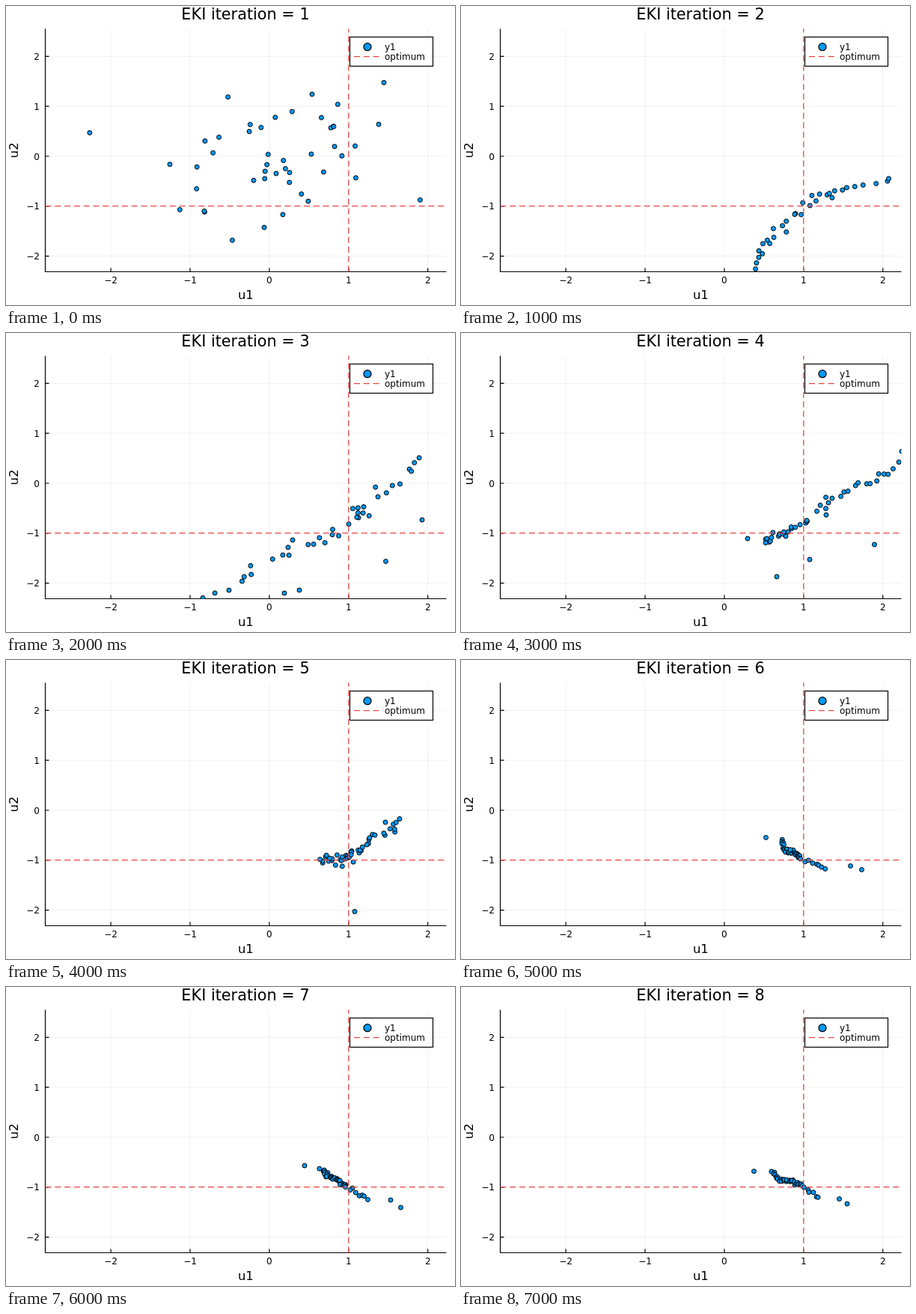
Recreate the animation shown at these times as an HTML page. Size 600 by 400 pixels, loop 8 s.

```html
<!DOCTYPE html>
<html lang="en">
<head>
<meta charset="utf-8">
<title>EKI iterations</title>
<style>
  html, body { margin: 0; width: 100%; height: 100%; overflow: hidden; background: #fff; }
  svg { display: block; font: 12px "DejaVu Sans", sans-serif; }
  .grid { stroke: #000; stroke-opacity: .06; }
  .axis { stroke: #000; stroke-width: 1.2; fill: none; }
  .dot { fill: #009afa; stroke: #000; }
  .optimum { stroke: #e94848; stroke-width: 1.3; stroke-dasharray: 8 4.8; }
  .mid { text-anchor: middle; }
  .end { text-anchor: end; }
  .title { font-size: 20.8px; }
  .guide { font-size: 16.4px; }
  .step { visibility: hidden; animation: show 8s step-end infinite; }
  @keyframes show {
    0% { visibility: visible; }
    12.5%, 100% { visibility: hidden; }
  }
</style>
</head>
<body>
<svg width="600" height="400" viewBox="0 0 600 400">
  <clipPath id="plot"><rect x="52.5" y="30.5" width="536" height="325"/></clipPath>
  <g id="frame"></g>
  <path class="axis" d="M52.5 30.5V355.5H588.5"/>
  <text class="mid guide" x="320.3" y="392">u1</text>
  <text class="mid guide" transform="translate(16 193) rotate(-90)">u2</text>
  <g id="steps"></g>
  <path class="optimum" d="M457.8 355.5V30.5"/>
  <path class="optimum" d="M52.5 267.7H588.5"/>
  <rect x="459.5" y="41.5" width="111" height="39" fill="#fff" stroke="#000" stroke-width="1.2"/>
  <circle class="dot" cx="483" cy="54.7" r="5" stroke-width="1.3"/>
  <path class="optimum" d="M465 67.7H499"/>
  <text x="506" y="59">y1</text>
  <text x="506" y="72">optimum</text>
</svg>
<script>
const SIZE = 46;
const toX = u => 351.9 + 105.9 * u;
const toY = u => 201 - 66.8 * u;

const make = (parent, tag, attrs, text = '') => {
  const el = document.createElementNS('http://www.w3.org/2000/svg', tag);
  for (const key in attrs) el.setAttribute(key, attrs[key]);
  el.textContent = text;
  return parent.appendChild(el);
};

const frame = document.getElementById('frame');
for (let v = -2; v <= 2; v++) {
  const x = toX(v), y = toY(v);
  const label = String(v).replace('-', '\u2212');
  make(frame, 'path', { class: 'grid', d: `M${x} 30.5V355.5M52.5 ${y}H588.5` });
  make(frame, 'path', { class: 'axis', d: `M${x} 355.5v-5M52.5 ${y}h5` });
  make(frame, 'text', { class: 'mid', x, y: 371 }, label);
  make(frame, 'text', { class: 'end', x: 45, y: y + 4.5 }, label);
}

let seed = 7;
const random = () => (seed = seed * 48271 % 2147483647) / 2147483647;
const normal = () => Math.sqrt(-2 * Math.log(1 - random())) * Math.cos(2 * Math.PI * random());

// The prior is a standard normal cloud.
const prior = () => Array.from({ length: SIZE }, () => [toX(normal()), toY(normal())]);

// Particles spread evenly over the path's segments with some noise, plus stray ones.
const along = (spread, path, strays) => {
  const count = SIZE - strays.length;
  const cloud = Array.from({ length: count }, (_, i) => {
    const t = i / (count - 1) * (path.length - 1);
    const k = Math.min(Math.floor(t), path.length - 2);
    const [a, b] = [path[k], path[k + 1]];
    return a.map((v, j) => v + (b[j] - v) * (t - k) + spread * normal());
  });
  return [...cloud, ...strays];
};

const steps = document.getElementById('steps');
let iteration = 0;
const addStep = cloud => {
  const step = make(steps, 'g', { class: 'step', style: `animation-delay:${iteration - 8}s` });
  make(step, 'text', { class: 'mid title', x: 320, y: 18.3 }, `EKI iteration = ${++iteration}`);
  const dots = make(step, 'g', { 'clip-path': 'url(#plot)' });
  for (const [cx, cy] of cloud) make(dots, 'circle', { class: 'dot', cx, cy, r: 3 });
};

addStep(prior());
addStep(along(4,
  [[340, 470], [392, 352], [407, 316], [436, 286], [475, 257], [506, 246], [582, 232], [700, 200]], []));
addStep(along(5,
  [[170, 378], [278, 352], [352, 304], [406, 282], [460, 257], [470, 237], [506, 214], [555, 167]],
  [[372, 348], [392, 344], [507.5, 305.5], [556, 250]]));
addStep(along(4,
  [[405, 282], [421, 270], [440, 266], [471, 249], [500, 219], [548, 198], [587, 168]],
  [[383, 275], [422, 326], [466, 303], [552.5, 283]]));
addStep(along(4,
  [[420, 270], [440, 268], [456, 266], [470, 254], [500, 235], [525, 215]],
  [[466, 336.5]]));
addStep(along(1.5,
  [[428, 240], [431, 252], [436, 257], [444, 256], [450, 261], [455, 265], [487, 279]],
  [[407.5, 237.5], [520.5, 275.5], [535.5, 280.5]]));
addStep(along(1.5,
  [[421, 242], [428, 252], [434, 256], [443, 257], [449, 262], [455, 267], [483, 284]],
  [[399, 239], [514, 285], [527.5, 295]]));
addStep(along(1.5,
  [[416, 247], [424, 257], [432, 259], [440, 259], [447, 262], [452, 264], [478, 281]],
  [[391.5, 246.5], [505.5, 283.5], [516, 290]]));
</script>
</body>
</html>
```
